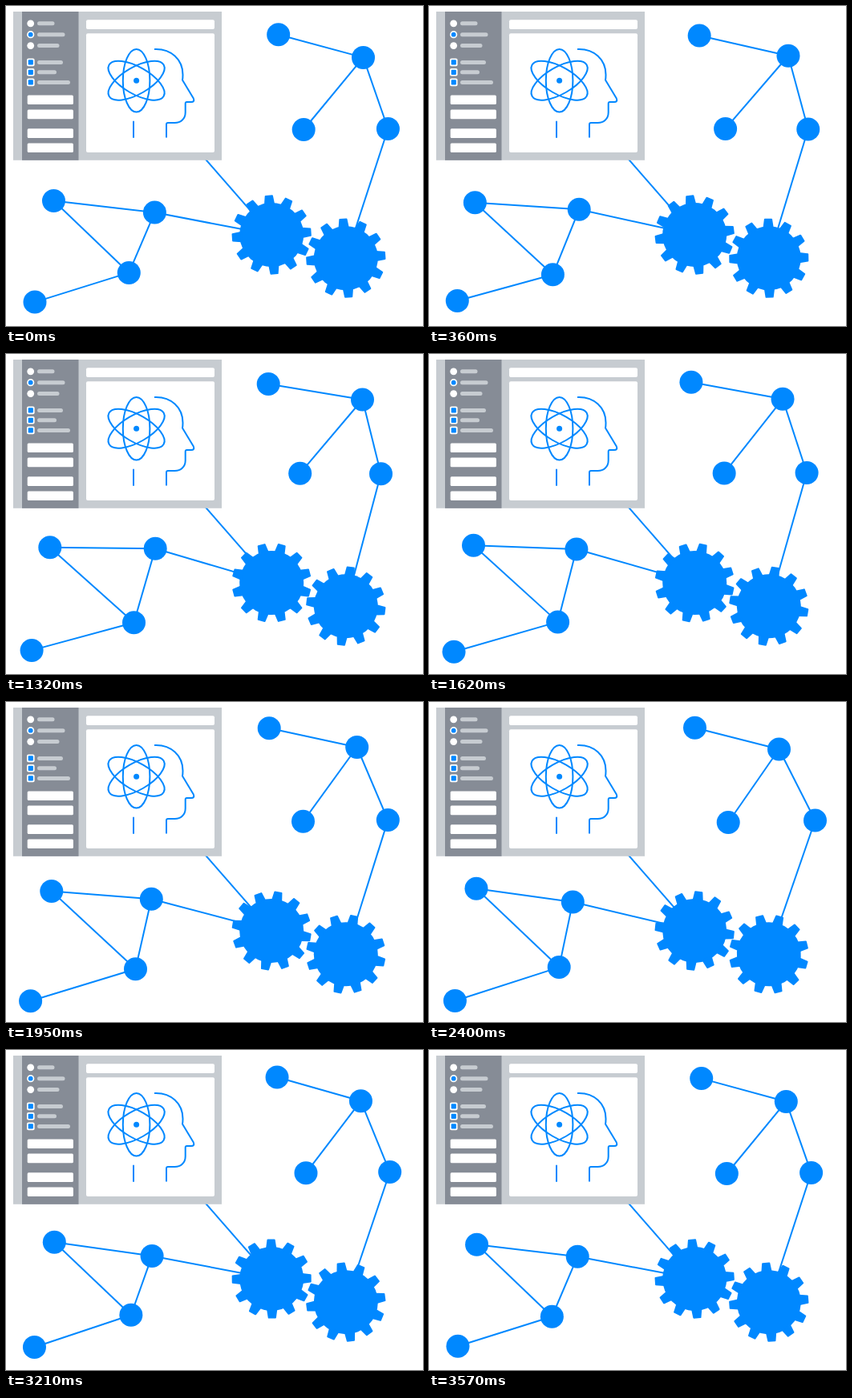
Animation, 520 px wide and 400 px high, one loop 3600 ms. Source, as an HTML page:

```html
<!DOCTYPE html>
<html lang="en">
<head>
<meta charset="utf-8">
<title>Connected gears</title>
<style>
  html, body { margin: 0; width: 100%; height: 100%; overflow: hidden; background: #fff; }
  svg { display: block; width: 520px; height: 400px; }
  .blue { fill: #08f; }
  .line { fill: none; stroke: #08f; stroke-width: 2; }
  .tooth { fill: #08f; stroke: #08f; stroke-width: 2; stroke-linejoin: round; }
  .white { fill: #fff; }
  .grey { fill: #c7ccd1; }
  .dash { fill: none; stroke: #c7ccd1; stroke-width: 5; stroke-linecap: round; }
</style>
</head>
<body>
<svg viewBox="0 0 520 400">
  <defs>
    <path id="tooth" class="tooth" d="M-5.6-38L-4.1-48.5H4.1L5.6-38Z"/>
    <g id="check">
      <rect class="white" x="-4.8" y="-4.8" width="9.6" height="9.6" rx="2"/>
      <rect class="blue" x="-3.1" y="-3.1" width="6.2" height="6.2" rx="1"/>
    </g>
    <rect id="button" class="white" x="26.7" width="57.2" height="11.7" rx="1.5"/>
    <ellipse id="orbit" class="line" rx="16.8" ry="39.3"/>
  </defs>

  <g id="links"></g>
  <g id="nodes"></g>
  <g id="gears"></g>

  <rect class="grey" x="9" y="7" width="260" height="185.8"/>
  <rect x="20" y="7" width="70.5" height="185.8" fill="#868c96"/>
  <rect class="white" x="100" y="17.3" width="160" height="11.7" rx="2"/>
  <rect class="white" x="100" y="34.3" width="160" height="148.7" rx="2"/>

  <g class="white">
    <circle cx="30.7" cy="21.8" r="4.4"/>
    <circle cx="30.7" cy="35.7" r="4.6"/>
    <circle cx="30.7" cy="49.6" r="4.4"/>
  </g>
  <circle class="blue" cx="30.7" cy="35.7" r="2.9"/>
  <use href="#check" x="30.8" y="70.4"/>
  <use href="#check" x="30.8" y="82.8"/>
  <use href="#check" x="30.8" y="95.4"/>
  <path class="dash" d="M41.5 21.8H58M41.5 35.7H71M41.5 49.6H64M41.5 70.4H68.5M41.5 82.8H60.5M41.5 95.4H77.5"/>
  <use href="#button" y="111.4"/>
  <use href="#button" y="129.5"/>
  <use href="#button" y="153.3"/>
  <use href="#button" y="171.4"/>

  <g transform="translate(162.6 93.2)">
    <use href="#orbit"/>
    <use href="#orbit" transform="rotate(60)"/>
    <use href="#orbit" transform="rotate(-60)"/>
    <circle class="blue" r="3.5"/>
  </g>
  <path class="line" stroke-linejoin="round" d="M185 54C206 53 220.5 67 220.5 86Q220.5 90 220 92.5L233.8 115.5Q235.5 120 231 120H225.5Q223.7 120 223.7 122V133C223.7 141 218 146 210.5 146H202Q200 146 200 148V164.5M159 143.8V164.8"/>
</svg>

<script>
const LOOP = 3600;
const TIMES = [0, 720, 1320, 1950, 2400, 2850];

// Waypoints as x, y pairs, one per entry in TIMES
const PATHS = {
  a: [339.7, 35.7, 333.2, 38, 327.2, 37.5, 328.2, 32.8, 331.5, 32.2, 335, 32.6],
  b: [445.5, 64.4, 449, 59.5, 444.5, 57, 437.7, 56.5, 436.5, 59, 439.5, 62],
  c: [371.2, 154.5, 368.3, 151.8, 366.7, 149.2, 370.5, 149.3, 373.2, 150.5, 375.5, 152.4],
  d: [476.4, 153.5, 469.4, 153.6, 467.5, 149.8, 476.3, 147.6, 481.5, 148, 480.1, 151],
  e: [59.5, 243.5, 55.3, 246.6, 54.8, 241.8, 56.8, 236.4, 59, 233.2, 60.2, 236.8],
  f: [185.4, 258.1, 188, 249.3, 186.2, 243.3, 181.3, 246.3, 179.3, 250, 179.5, 254.6],
  g: [153.3, 333.4, 156.6, 337.4, 159.5, 335.8, 161.5, 333.7, 162.2, 331.6, 159.2, 330.2],
  h: [36, 370.1, 34.1, 367.7, 32.1, 370.4, 30.6, 373.8, 32.4, 373.5, 34.3, 372.7]
};
const FIXED = { left: [331.2, 286], right: [423.8, 315.2], panel: [240, 181.5] };
const LINKS = [
  'a b', 'b c', 'b d', 'd right', 'e f', 'e g', 'f g', 'g h', 'f left', 'panel left'
].map(s => s.split(' '));

function add(parent, tag, attrs) {
  const el = document.createElementNS('http://www.w3.org/2000/svg', tag);
  set(el, attrs);
  return parent.appendChild(el);
}

function set(el, attrs) {
  for (const k in attrs) el.setAttribute(k, attrs[k]);
}

const byId = id => document.getElementById(id);
const count = TIMES.length;
const wrap = i => (i + count) % count;
const timeAt = i => TIMES[wrap(i)] + LOOP * Math.floor(i / count);

// Closed cubic curve through the waypoints, smooth over uneven time steps
function along(path, t) {
  let i = count - 1;
  while (TIMES[i] > t) i--;
  const span = timeAt(i + 1) - timeAt(i);
  const u = (t - TIMES[i]) / span;
  return [0, 1].map(axis => {
    const at = k => path[2 * wrap(k) + axis];
    const step = k => timeAt(k + 1) - timeAt(k);
    const rate = k => (at(k + 1) - at(k)) / step(k);
    const slope = k => (rate(k - 1) * step(k) + rate(k) * step(k - 1)) / (step(k) + step(k - 1));
    const v = 1 - u;
    return v * v * ((1 + 2 * u) * at(i) + u * span * slope(i)) +
           u * u * ((1 + 2 * v) * at(i + 1) - v * span * slope(i + 1));
  });
}

function makeGear() {
  const gear = add(byId('gears'), 'g', {});
  add(gear, 'circle', { class: 'blue', r: 40 });
  for (let i = 0; i < 12; i++) {
    add(gear, 'use', { href: '#tooth', transform: `rotate(${i * 30})` });
  }
  return gear;
}

const lines = LINKS.map(() => add(byId('links'), 'line', { class: 'line' }));
const dots = {};
for (const k in PATHS) dots[k] = add(byId('nodes'), 'circle', { class: 'blue', r: 14.5 });
const leftGear = makeGear();
const rightGear = makeGear();

function turn(gear, [x, y], angle) {
  set(gear, { transform: `translate(${x} ${y}) rotate(${angle})` });
}

function draw(now) {
  const t = now % LOOP;
  const pos = { ...FIXED };
  for (const k in PATHS) {
    pos[k] = along(PATHS[k], t);
    set(dots[k], { cx: pos[k][0], cy: pos[k][1] });
  }
  LINKS.forEach(([from, to], i) => {
    const [x1, y1] = pos[from], [x2, y2] = pos[to];
    set(lines[i], { x1, y1, x2, y2 });
  });
  const angle = 30 * t / LOOP;
  turn(leftGear, pos.left, -4 - angle);
  turn(rightGear, pos.right, -4 + angle);
}

function tick() {
  draw(performance.now());
  requestAnimationFrame(tick);
}
tick();
</script>
</body>
</html>
```
